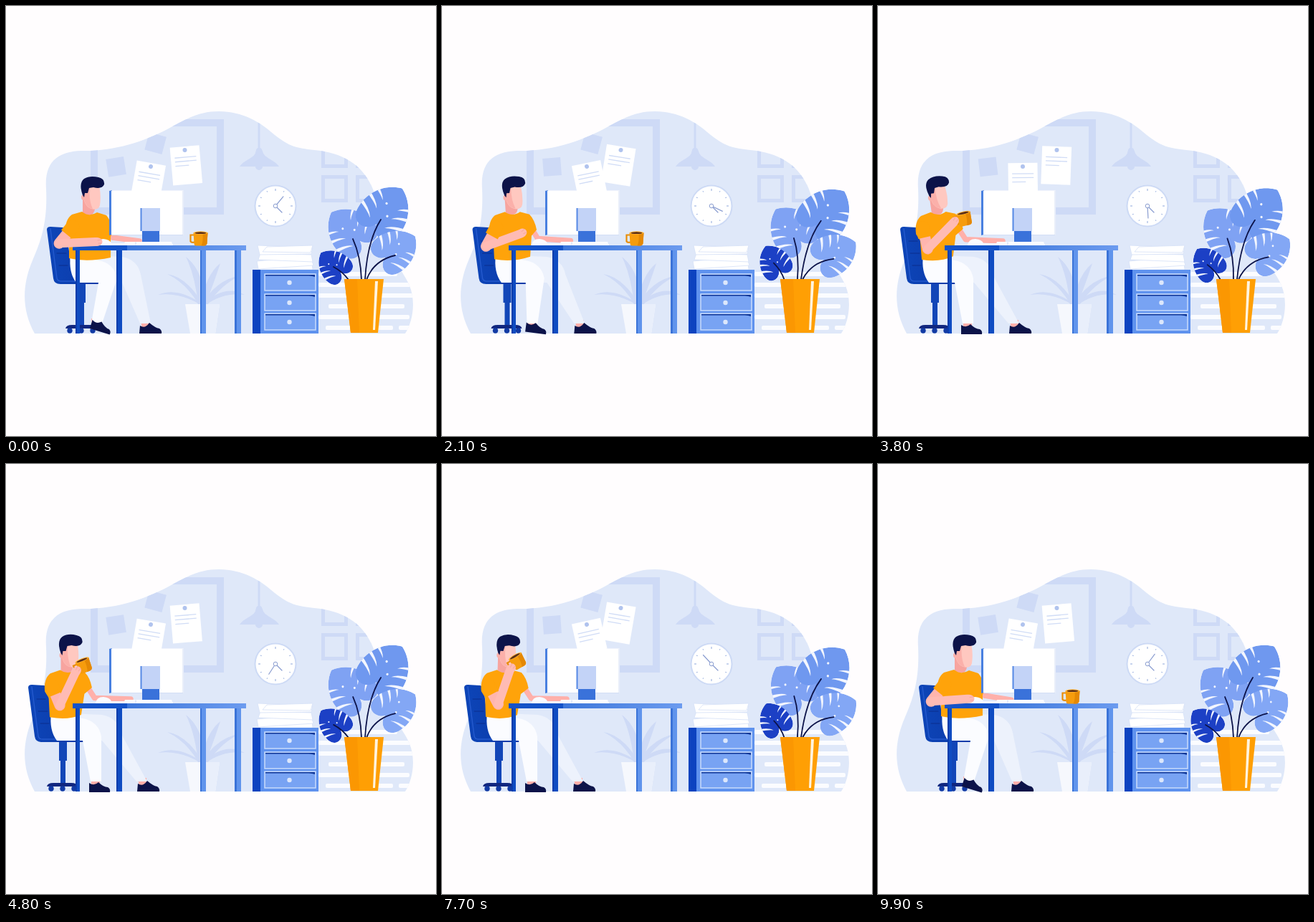
These frames come from a looping animation (600 px wide and 600 px high, 10000 ms). An HTML page:

```html
<!DOCTYPE html>
<html lang="en">
<head>
<meta charset="utf-8">
<title>Coffee break</title>
<style>
html, body { margin: 0; width: 100%; height: 100%; overflow: hidden; background: #fffdfe }
svg { display: block; width: 100vw; height: 100vh }
.pale { fill: #cedaf6 }
.frame { fill: none; stroke: #cedaf6 }
.line { fill: none; stroke-linecap: round; stroke-linejoin: round }
</style>
</head>
<body>
<svg viewBox="0 0 600 600">
<defs>
  <clipPath id="blob"><path id="blobShape" d="M40 457C22 425 22 390 37 355C50 325 58 300 56 255C53 215 75 203 105 202C150 203 190 190 225 172C255 155 272 147 297 147C330 147 355 162 375 180C395 196 405 198 430 201C488 206 517 240 520 295C522 340 550 360 563 390C572 412 568 440 557 457Z"/></clipPath>
  <clipPath id="leafClip"><path id="leafShape" d="M.07 0C-.2 -.08 -.24 -.48 .13 -.52C.5 -.56 .86 -.36 1 0C.86 .36 .5 .56 .13 .52C-.24 .48 -.2 .08 .07 0Z"/></clipPath>
  <linearGradient id="deskTop"><stop stop-color="#3c76da"/><stop offset="1" stop-color="#6c9bef"/></linearGradient>
  <linearGradient id="back"><stop stop-color="#0d45b8"/><stop offset="1" stop-color="#0b37a4"/></linearGradient>
</defs>

<use href="#blobShape" fill="#dfe8f9"/>
<g clip-path="url(#blob)">
  <rect class="frame" x="123" y="163" width="176" height="123" stroke-width="10"/>
  <g class="frame" stroke-width="5">
    <path d="M442.500 190V223.500H474.500V190M490.500 190V223.500H523V190"/>
    <rect x="442.500" y="238.500" width="32" height="33"/>
    <rect x="490.500" y="238.500" width="32" height="33"/>
  </g>
  <path class="pale" d="M351.500 150H354.500V198C358 199 358 205 360 207C364 213 376 216 381 224H358A5 5 0 0 1 348 224H326C331 216 343 213 347 207C349 205 348 199 351.500 198Z"/>
  <rect class="pale" x="196" y="179" width="25" height="25" transform="rotate(15 208 192)"/>
  <g id="floor" fill="#fbfcff"></g>
</g>
<rect id="note" class="pale" x="141" y="212" width="25" height="25"/>
<g id="sheetL"></g>
<g id="sheetR"></g>

<circle cx="376" cy="279" r="28.500" fill="#fff" stroke="#cddaf5" stroke-width="2"/>
<g id="ticks" stroke="#8fa8dc"></g>
<g class="line" stroke="#8a9dd0" stroke-width="1.200">
  <path d="M376 279L385 288"/>
  <path id="minute" d="M376 279V262"/>
</g>
<circle cx="376" cy="279" r="2.800" fill="#fff" stroke="#8a9dd0"/>

<g class="pale">
  <path d="M275 417Q240 391 212 403Q242 399 272 417Z"/>
  <path d="M275 417Q253 378 225 374Q252 387 269 417Z"/>
  <path d="M277 417Q277 370 251 350Q264 376 268 417Z"/>
  <path d="M272 417Q278 376 299 359Q290 387 278 417Z"/>
  <path d="M273 417Q293 382 327 376Q300 389 281 417Z"/>
  <path d="M273 417Q306 387 333 403Q304 399 279 417Z"/>
</g>
<path d="M250 416H298L292 457H257Z" fill="#f6f8fd"/>
<path d="M279 416H298L292 457H277Z" fill="#e9effb"/>

<g id="chair">
  <path d="M100 387H111V414H109V446H102V414H100Z" fill="#1246b8"/>
  <path d="M83 450Q84 445 92 445H117Q125 445 126 450Z" fill="#11277f"/>
  <g fill="#123aa4"><circle cx="89" cy="453" r="3.700"/><circle cx="105" cy="453" r="3.700"/><circle cx="121" cy="453" r="3.700"/></g>
  <path d="M57 312Q57 308 62 308L79 309Q83 310 84 314L93 377L138 381Q143 382 141 386L134 388H76Q67 388 66 380Z" fill="url(#back)"/>
  <path class="line" d="M62 311L71 380Q72 384 77 384H134" stroke="#2459cd" stroke-width="1.500"/>
  <path class="line" d="M69 328H81M71 345H84M74 362H86" stroke="#0a2c8c"/>
</g>

<path id="farArm" class="line" stroke="#ffb0aa" stroke-width="7.500"/>
<g fill="#ffb0aa"><rect x="119" y="436" width="12" height="15"/><path id="farAnkle" d="M188 438H200V452H190Z"/></g>
<path id="farLeg" fill="#edf2fc"/>
<path id="nearLeg" fill="#fbfcff"/>
<g fill="#0c1349">
  <path id="nearShoe" d="M116 445Q123 450 129 444Q136 451 142 451Q146 453 145 458H116Z"/>
  <path id="farShoe" d="M187 446Q194 451 200 442Q208 449 214 450Q218 453 217 457H186Z"/>
</g>

<g id="torso">
  <g id="head">
    <path d="M107 270H124V284Q122 293 114 291Q108 291 107 288Z" fill="#f7a49f"/>
    <path d="M108 251H130Q133 264 131 278Q129 286 119 283Q109 280 108 264Z" fill="#ffc8c0"/>
    <path d="M108 251H117Q115 270 121 283Q110 282 108 264Z" fill="#fbb0aa"/>
    <circle cx="109" cy="267" r="4" fill="#fbb0aa"/>
    <path d="M107 264Q101 247 109 241Q117 236 129 239Q138 241 137 249Q134 256 122 253L116 254L114 261L110 261L109 267Z" fill="#0c1349"/>
  </g>
  <path id="shirt" fill="#ffa30a"/>
</g>

<path d="M97 341H103V457H97ZM154 341H162V457H154Z" fill="#0f4cc2"/>
<path d="M97 341H99V457H97ZM154 341H156V457H154Z" fill="#0b3cab"/>
<path d="M271 341H279V457H271ZM319 341H328V457H319Z" fill="#6094ec"/>
<path d="M271 341H273V457H271ZM319 341H322V457H319Z" fill="#3a73d8"/>
<path d="M93 334H170V341H93Z" fill="#1553c8"/>
<path d="M169 334H335V341H169Z" fill="url(#deskTop)"/>

<path d="M144 258L148 257V319L144 320Z" fill="#4880e0"/>
<rect x="147" y="257.500" width="101" height="62" rx="1" fill="#fff"/>
<path d="M148 319.500H247V258" fill="none" stroke="#d3def5"/>
<rect x="188" y="282" width="27" height="32" fill="#c3d3f7"/>
<path d="M187.500 282H189.500V314H187.500Z" fill="#5588e4"/>
<path d="M190 314H214V329H190Z" fill="#3a72da"/>
<path d="M166 329H231L233 334H164Z" fill="#fbfcff"/>
<path d="M181 329.500V333.500" stroke="#c9d7f4"/>
<path d="M125 334Q126 325 136 325Q145 326 147 331H180V334Z" fill="#f9faff"/>

<g stroke="#d5e0f6" stroke-width=".8" fill="#fff">
  <path d="M353 357L427 358L428 368H353Z"/>
  <path d="M350 356L425 349L429 362L352 367Z"/>
  <path d="M355 345L426 347L428 357L352 354Z"/>
  <path d="M351 334L428 337L426 346L354 347Z"/>
  <path d="M364 336L428 334L425 344L358 343Z"/>
</g>
<rect x="344" y="368" width="92" height="89" fill="#5f92ee"/>
<rect x="344" y="368" width="11" height="89" fill="#0d43c0"/>
<g id="drawers"></g>

<g id="plant"></g>
<path d="M472 381H527L519 456H481Z" fill="#ff9f04"/>
<path d="M472 381H490L493 456H481Z" fill="#fb9702"/>
<path d="M515 384H519L515 452H512Z" fill="#fff4df"/>

<g id="cup">
  <path d="M-7 -5H-12V4Q-11 6 -6 5" fill="none" stroke="#e88c06" stroke-width="2.200"/>
  <path d="M-8 -8H12L11 7Q10 10 7 10H-4Q-7 10 -7 7Z" fill="#f69c0d"/>
  <path d="M5 -8H12L11 7Q10 10 7 10H3Q6 4 5 -8Z" fill="#e48804"/>
  <ellipse cx="2" cy="-8" rx="10" ry="2.200" fill="#ffb63a"/>
  <ellipse cx="2" cy="-7.800" rx="8" ry="1.400" fill="#5c2f18"/>
</g>
<g class="line">
  <path id="upperArm" stroke="#ffb5ae" stroke-width="15"/>
  <path id="foreArm" stroke="#ffbbb4" stroke-width="12"/>
  <path id="sleeve" stroke="#ffa30a" stroke-width="19" style="stroke-linecap:butt"/>
  <circle id="shoulder" r="9.500" fill="#ffa30a"/>
</g>
<g id="hand" fill="#ffbbb4"><ellipse cx="2" rx="7.500" ry="6"/><path class="line" d="M3 -2L8 -3M4 2L8 2" stroke="#f6a89f"/></g>
</svg>

<script>
const $ = id => document.getElementById(id);
const set = (id, d) => $(id).setAttribute('d', d);
const move = (id, m) => $(id).setAttribute('transform', m);
const mix = (a, b, u) => a + (b - a) * u;
const ease = u => u * u * (3 - 2 * u);

// Eased values at time t from [time, ...values] keys
function key(t, keys) {
  const i = keys.findIndex(k => k[0] > t);
  if (i < 0) return keys.at(-1).slice(1);
  if (!i) return keys[0].slice(1);
  const a = keys[i - 1], b = keys[i], u = ease((t - a[0]) / (b[0] - a[0]));
  return a.slice(1).map((v, j) => mix(v, b[j + 1], u));
}

function turn(x, y, cx, cy, deg) {
  const a = deg * Math.PI / 180, c = Math.cos(a), s = Math.sin(a);
  return [cx + (x - cx) * c - (y - cy) * s, cy + (x - cx) * s + (y - cy) * c];
}

// Static parts built from short rules
$('floor').innerHTML = [[371, 436, 546], [386, 436, 490], [386, 498, 570], [401, 436, 570],
  [416, 450, 556], [431, 436, 508], [431, 516, 563], [446, 446, 540], [446, 548, 570]]
  .map(([y, a, b]) => `<rect x="${a}" y="${y}" width="${b - a}" height="6" rx="2"/>`).join('');

const sheet = (x, y, h) => `<rect x="${x - 20.5}" y="${y - 5}" width="41" height="${h}" fill="#fff"/>
  <circle cx="${x}" cy="${y}" r="3" fill="#b0c3ee"/>
  <path d="M${x - 15} ${y + 10}h30m-30 5.500h30m-30 6h19" fill="none" stroke="#d0dcf6" stroke-width="1.300"/>`;
$('sheetL').innerHTML = sheet(202, 224, 44);
$('sheetR').innerHTML = sheet(249.5, 201, 53);

for (let a = 0; a < 360; a += 30)
  $('ticks').innerHTML += `<path d="M376 255v${a % 90 ? 1.5 : 3}" transform="rotate(${a} 376 279)"/>`;

$('drawers').innerHTML = [375, 403, 430].map(y => `
  <rect x="361" y="${y - 1}" width="71" height="23" fill="#78a3f3" stroke="#c9dbfc" stroke-width="1.500"/>
  <path d="M362 ${y}H431V${y + 3}Q427 ${y + 1} 420 ${y + 1.5}H362Z" fill="#0e3596"/>
  <circle cx="395.500" cy="${y + 11}" r="3.200" fill="#dce7fc"/>`).join('');

// Leaves: base x, y, angle, length, colour, stem, pivot x, swing
const leaves = [
  [497, 331, -135, 61, '#7fa2f3', 'M496 382Q495 349 484 325', 496, 7.5],
  [514, 308, -54, 66, '#6f98ef', 'M501 382Q504 328 523 298', 501, 4.3],
  [526, 353, -35, 55, '#83a7f5', 'M503 382Q513 355 543 348', 503, 7],
  [469, 374, -135, 42, '#1c40c5', 'M478 382Q470 371 457 364', 478, 18]
];
const slits = [1, -1].map(s => [.1, .34, .56].map(x =>
  `M${x} ${s * .19}Q${x + .09} ${s * .3} ${x + .17} ${s * .6}h.08Q${x + .14} ${s * .27} ${x} ${s * .19}Z`
).join('')).join('');
$('plant').innerHTML = leaves.map(([x, y, a, size, fill, stem], i) => `<g id="leaf${i}">
  <g transform="translate(${x} ${y}) rotate(${a}) scale(${size})" clip-path="url(#leafClip)">
    <use href="#leafShape" fill="${fill}"/>
    <path d="${slits}" fill="#f3f6fe"/>
    <g fill="#f3f6fe"><circle cx=".34" cy=".09" r=".025"/><circle cx=".55" cy="-.08" r=".025"/></g>
  </g>
  <path class="line" d="${stem}" stroke="#0c1349" stroke-width="1.800"/></g>`).join('');

const leg = (hip, top, knee, foot) => `M${hip} 347L${knee - 16} ${top}Q${knee + 6} ${top + 4} ${knee + 10} ${top + 25}
  L${foot + 8} 443H${foot - 7}L${knee - 16} 386H${hip + 8}Q${hip - 3} 372 ${hip} 347Z`;

function draw(t) {
  // Breeze, two swings per loop
  const sway = (1 - Math.cos(t * Math.PI / 2500)) / 2;
  move('note', `rotate(${mix(-9, -4, sway)} 153 224)`);
  move('sheetL', `rotate(${mix(10, -13, sway)} 202 224)`);
  move('sheetR', `rotate(${mix(-5, 10, sway)} 249.5 201)`);
  leaves.forEach((l, i) => move('leaf' + i, `rotate(${l[7] * sway} ${l[6]} 381)`));
  move('minute', `rotate(${40 + t * .036} 376 279)`);

  // Rolling back from the desk and returning; leaning and nodding with each sip
  const [r] = key(t, [[1400, 0], [2700, 1], [8750, 1], [9800, 0]]);
  const [lean, nod] = key(t, [[1400, 0, 0], [2700, -5, -2], [3600, -5, -4], [4600, -3, 3], [4900, -3, 3],
    [6000, -5, -8], [6250, -5, -8], [7500, -2, 4], [7900, -2, 4], [8750, -5, -2], [9800, 0, 0]]);
  const dx = -27 * r, hip = 112 + dx;
  move('chair', `translate(${-26 * r} 0)`);
  move('torso', `translate(${dx} 0) rotate(${lean} 112 352)`);
  move('head', `rotate(${nod} 114 285)`);
  set('shirt', `M106 287Q116 295 127 288L140 292Q147 300 149 314L${mix(146, 138, r)} 322
    L${mix(146, 132, r)} 351Q113 358 88 352L88 325L83 316Q82 298 92 291Z`);
  set('nearLeg', leg(90 + dx, 355, mix(145, 123, r), mix(126, 125, r)));
  set('farLeg', leg(95 + dx, 350, mix(178, 150, r), mix(194, 189, r)));
  move('nearShoe', `rotate(${mix(17, 0, r)} 143 457)`);
  move('farShoe', `translate(${-3 * r} 0)`);
  move('farAnkle', `translate(${-4 * r} 0)`);

  // Arms: typing, then lifting the cup twice
  const tap = Math.sin(t * Math.PI / 200) * 1.3 * (1 - r);
  const body = (x, y) => turn(x + dx, y, hip, 352, lean);
  const [sx, sy] = body(93, 308), [fx, fy] = body(140, 308);
  set('farArm', `M${fx} ${fy}L${fx + mix(8, 13, r)} ${fy + mix(15, 20, r)}L${mix(186, 174, r)} ${328 - tap}`);

  let [hx, hy] = key(t, [[1400, 125, 329], [2700, 97, 308], [2900, 97, 308], [3600, 106, 304],
    [4600, 97, 290], [4900, 97, 291], [6000, 106, 304], [6250, 106, 304],
    [7500, 95, 287], [7850, 95, 287], [8700, 106, 304], [9800, 125, 329]]);
  hy += tap;
  const upper = 30, fore = 51, d = Math.hypot(hx - sx, hy - sy);
  const bend = Math.acos(Math.max(-1, Math.min(1, (upper ** 2 + d ** 2 - fore ** 2) / (2 * upper * d))));
  const a = Math.atan2(hy - sy, hx - sx) + bend;
  const ex = sx + upper * Math.cos(a), ey = sy + upper * Math.sin(a);
  set('upperArm', `M${sx} ${sy}L${ex} ${ey}`);
  set('foreArm', `M${ex} ${ey}L${hx} ${hy}`);
  set('sleeve', `M${sx} ${sy}L${mix(sx, ex, .45)} ${mix(sy, ey, .45)}`);
  move('shoulder', `translate(${sx} ${sy})`);
  move('hand', `translate(${hx} ${hy}) rotate(${-50 * r})`);

  const [held] = key(t, [[2820, 0], [3600, 1], [8700, 1], [9600, 0]]);
  const [ox, oy, tilt] = key(t, [[3600, 14, -5, -12], [4600, 10, -9, -22], [4900, 10, -9, -22],
    [6000, 14, -5, -12], [6250, 14, -5, -12], [7500, 9, -11, -30], [7850, 9, -11, -30], [8700, 14, -5, -12]]);
  move('cup', `translate(${mix(269.5, hx + ox, held)} ${mix(324.5, hy + oy, held)}) rotate(${tilt * held})`);
}

function tick(now) {
  draw(Math.floor(now / 100) * 100 % 10000);
  requestAnimationFrame(tick);
}
draw(0);
requestAnimationFrame(tick);
</script>
</body>
</html>
```
